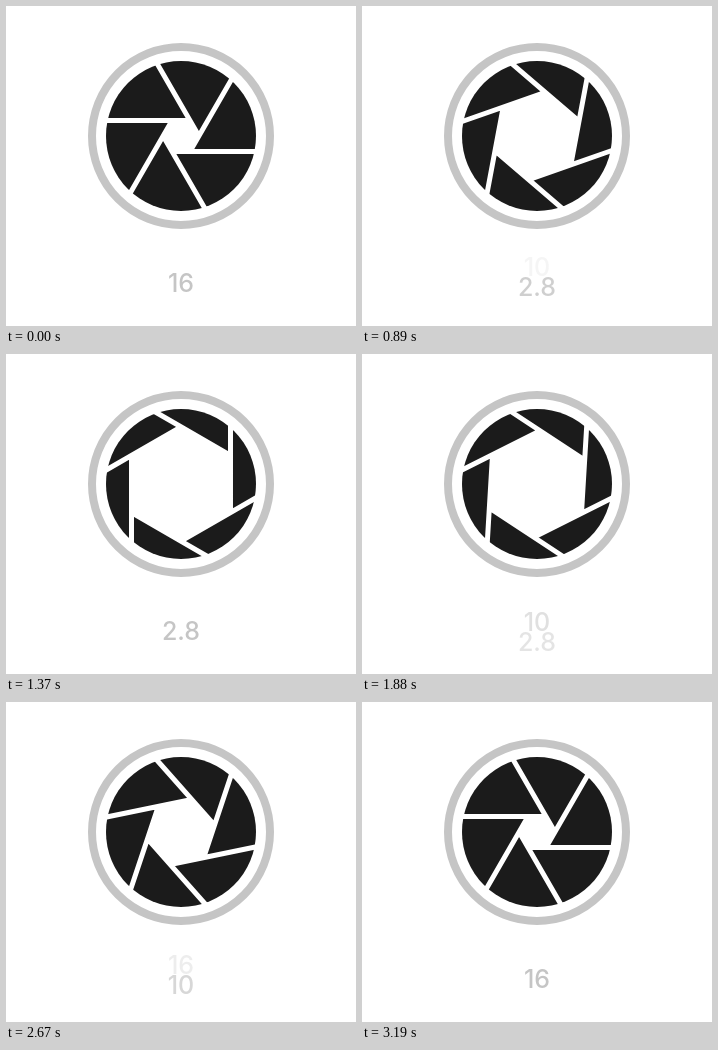
Animation of 350x320 px, one loop 3.7 s. Source, as an HTML page with a canvas:

```html
<!DOCTYPE html>
<html lang="en">
<head>
<meta charset="utf-8">
<title>Aperture</title>
<style>
  html, body { margin: 0; width: 100%; height: 100%; overflow: hidden; background: #fff; }
  canvas { display: block; }
</style>
</head>
<body>
<canvas id="stage" width="350" height="320"></canvas>
<script>
const ctx = document.getElementById('stage').getContext('2d');
const LOOP = 3700, STEP = 20, BLADE_LAG = 6;
const GREY = '#c5c5c5', BLACK = '#1b1b1b';
const PIVOT = { x: -72.15, y: -15.5 };
const stops = [
  { label: '16', angle: 0 },
  { label: '10', angle: 12.6 },
  { label: '2.8', angle: 30 }
];
const moves = [
  { start: 0, from: 0, to: 1 },
  { start: 810, from: 1, to: 2 },
  { start: 1840, from: 2, to: 1 },
  { start: 2650, from: 1, to: 0 }
];

const easeOut = t => 1 - (1 - Math.min(1, Math.max(0, t))) ** 4;

function disc(radius) {
  ctx.beginPath();
  ctx.arc(0, 0, radius, 0, 2 * Math.PI);
}

// Calls draw six times, each turned by a further 60 degrees.
function sixfold(angle, draw) {
  ctx.save();
  ctx.rotate(-angle);
  ctx.beginPath();
  for (let i = 0; i < 6; i++) {
    draw();
    ctx.rotate(Math.PI / 3);
  }
  ctx.restore();
}

function drawShutter(degrees) {
  const angle = degrees * Math.PI / 180;
  const sin = Math.sin(angle), cos = Math.cos(angle);
  const apothem = -PIVOT.x * sin - PIVOT.y * cos;
  const rim = PIVOT.x * cos - PIVOT.y * sin;
  const corner = apothem / Math.sqrt(3);

  ctx.save();
  ctx.translate(175, 130);
  disc(75);
  ctx.fillStyle = BLACK;
  ctx.fill();

  ctx.fillStyle = ctx.strokeStyle = '#fff';
  sixfold(angle, () => ctx.lineTo(corner, -apothem));
  ctx.fill();
  sixfold(angle, () => {
    ctx.moveTo(rim - 6, -apothem);
    ctx.lineTo(corner, -apothem);
  });
  ctx.lineWidth = 5;
  ctx.stroke();

  disc(89);
  ctx.strokeStyle = GREY;
  ctx.lineWidth = 8;
  ctx.stroke();
  ctx.restore();
}

function drawLabel(text, shift, alpha) {
  ctx.globalAlpha = alpha;
  ctx.fillStyle = GREY;
  ctx.fillText(text, 175, 286 + shift);
  ctx.globalAlpha = 1;
}

function render(time) {
  const move = moves.findLast(m => m.start <= time);
  const elapsed = Math.floor((time - move.start) / STEP) * STEP;
  const from = stops[move.from], to = stops[move.to];
  const turn = easeOut((elapsed - BLADE_LAG) / 640);
  const slide = easeOut(elapsed / 230);
  const travel = 20 * (move.to - move.from);

  ctx.fillStyle = '#fff';
  ctx.fillRect(0, 0, 350, 320);
  drawShutter(from.angle + (to.angle - from.angle) * turn);
  ctx.font = '500 25px Inter, sans-serif';
  ctx.textAlign = 'center';
  drawLabel(from.label, -travel * slide, 1 - slide);
  drawLabel(to.label, travel * (1 - slide), slide);
}

const origin = performance.now();
function tick() {
  render((performance.now() - origin) % LOOP);
  requestAnimationFrame(tick);
}
tick();
</script>
</body>
</html>
```
